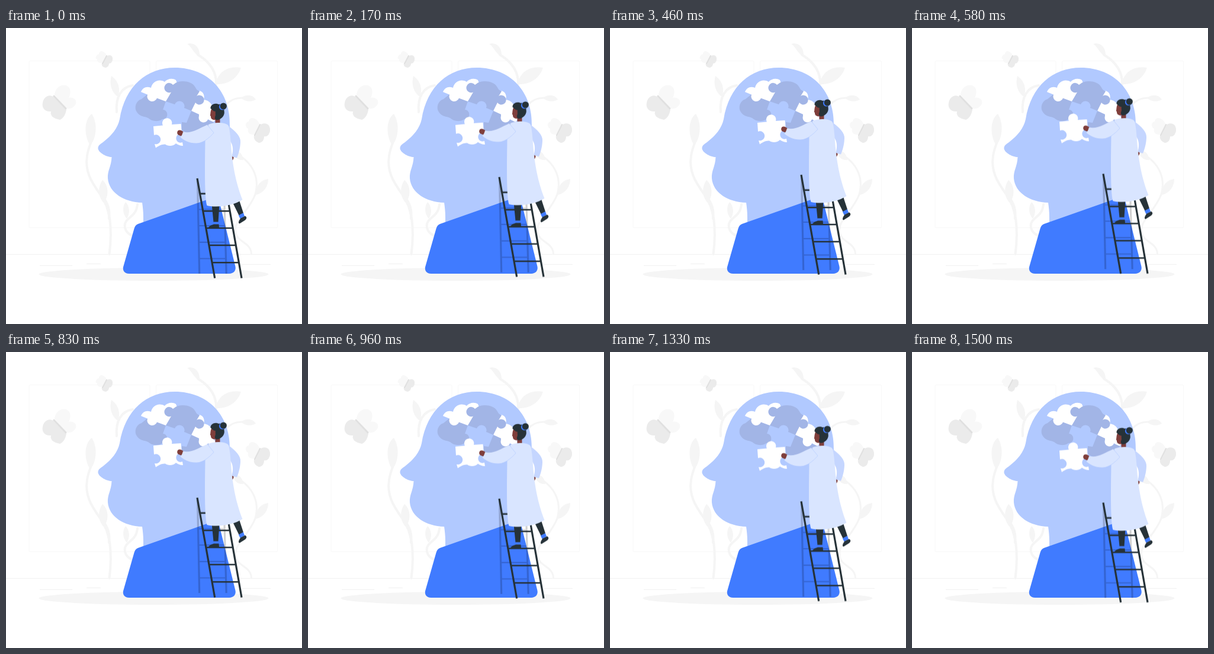
These frames come from a looping animation (500 px wide and 500 px high, 1.54 s). An HTML page:

```html
<!DOCTYPE html>
<html lang="en">
<head>
<meta charset="utf-8">
<title>Puzzle mind</title>
<style>
  html, body { margin: 0; width: 100%; height: 100%; overflow: hidden; background: #fff; }
  svg { display: block; width: 100vw; height: 100vh; }
  .line { fill: none; stroke-linecap: round; }
  .blue { fill: #407bff; }
  .pale { fill: #b1c9ff; }
  .shade { fill: #a2b5e6; }
  .white { fill: #fff; }
  .dark { fill: #263238; }
  .skin { fill: #7f3e3b; }
  .coat { fill: #d9e5ff; }
</style>
</head>
<body>
<svg viewBox="0 0 500 500">
  <!-- room -->
  <g fill="none" stroke="#f5f5f5" stroke-width=".7">
    <rect x="39" y="55.500" width="204" height="282" rx="2"/>
    <rect x="253.500" y="55.500" width="205" height="282" rx="2"/>
    <path stroke="#ebebeb" d="M0 382.400H500M136 398.400H160M57 401.400H112M399 399.400H447"/>
  </g>

  <!-- plants -->
  <g class="line" stroke="#f5f5f5" stroke-width="4">
    <path d="M174.500 382C180 340 177 306 160 282C143 259 133 241 137 216C139 202 143 196 146 186"/>
    <path d="M174 322C176 307 172 298 165 286"/>
    <path d="M214 351C200 346 196 331 207 322C214 316 221 311 222 298"/>
    <path d="M187 142C185 117 194 100 214 97"/>
    <path d="M355 95C356 72 342 56 324 45"/>
    <path stroke-width="3" d="M372 130C378 122 387 118 400 118"/>
    <path stroke-width="3" d="M388 212C416 226 429 252 421 281C411 309 383 326 388 346C392 363 414 362 414.500 382"/>
  </g>
  <g fill="#f5f5f5">
    <path d="M145 145C132 154 131 181 142 198C152 188 156 163 145 145Z"/>
    <path d="M163 257C155 267 155 286 165 295C174 285 174 266 163 257Z"/>
    <path d="M202 294C196 302 197 315 204 322C210 313 209 301 202 294Z"/>
    <path d="M178 81C174 96 179 110 189 116C194 103 190 89 178 81Z"/>
    <path d="M306 27C317 23 328 32 327 47C317 45 315 32 306 27Z"/>
    <path d="M397 67C375 63 357 75 354 95C374 96 391 86 397 67Z"/>
    <path d="M397 118C405 112 417 112 422 121C412 126 403 124 397 118Z"/>
    <path d="M443 255C428 257 421 269 422 282C435 279 443 268 443 255Z"/>
    <path d="M383 207C394 206 400 213 401 223C391 224 384 217 383 207Z"/>
  </g>

  <!-- butterflies -->
  <g fill="#f8f8f8">
    <path d="M82 113C83 98 98 93 105 99C111 104 108 114 106 118C114 116 120 122 118 128C113 137 106 137 102 136Z"/>
    <path d="M170 46C166 38 157 37 157 44C151 46 150 52 154 53C153 58 158 59 162 59Z"/>
    <path d="M428 162C424 151 411 149 410 158C403 159 404 168 409 170C407 178 414 181 419 180Z"/>
  </g>
  <g fill="#ebebeb">
    <path d="M80 116C71 111 64 117 62 126C60 135 66 142 76 141C74 148 80 153 91 155C98 152 101 144 102 138Z"/>
    <path d="M171 47C177 44 181 48 180 54C179 58 177 60 174 60C174 64 171 67 168 67C163 66 161 63 162 60Z"/>
    <path d="M430 163C440 158 447 164 446 174C444 182 440 184 436 183C436 190 432 194 427 194C420 191 418 186 419 182Z"/>
  </g>
  <g class="line" stroke="#e0e0e0" stroke-width="3">
    <path d="M81 115L101 136"/>
    <path stroke-width="2" d="M170 47L163 60M429 163L420 181"/>
  </g>

  <ellipse cx="249.500" cy="416" rx="194" ry="11" fill="#f5f5f5"/>

  <!-- head and bust -->
  <path class="pale" d="M232 340L232 320C232 310 231 302 230 295C199 294 174 278 172 254C171 241 178 234 178.500 218C170 218 157 211 155.500 204C155 198 160 196 165 192C178 182 189 169 192 154C201 98 238 67 285 67C342 67 380 108 378 166C377 210 350 240 358 292L300 340Z"/>
  <path class="blue" d="M223 331L358 283.500L387.500 403C389 410 384 415 377 415H208C200 415 196 409 198.500 402L216.500 339Q218 333 223 331Z"/>

  <!-- brain -->
  <path class="shade" d="M229 120C219 123 216 135 221 142C226 150 234 149 240 152C247 158 257 159 264 154C276 154 274 138 265 138L270 124L239 112Z"/>
  <path class="white" d="M228 108C231 100 238 98 245 101C247 91 258 85 268 91C272 86 281 84 287 88L290 96L270 124L255 118.500A8.200 8.200 0 1 1 239 112.500Z"/>
  <path class="white" d="M327 106C334 108 336 115 334 121C348 123 351 135 349 146C355 150 355 156 350 159L341 154A8.200 8.200 0 1 1 326 149L326 146L313 140L320 118Z"/>
  <path class="shade" d="M285 94C292 88 313 88 319 99C321 102 322 105 327 107L322 115A8 8 0 1 1 320 126L313 140L301 135A8.200 8.200 0 1 0 285 129L270 124L279 108.500A8.200 8.200 0 1 1 282 96Z"/>
  <path class="shade" d="M313 140L326 146L325.500 151A8.200 8.200 0 0 0 341 155L351 159C347 168 339 172 331 173C323 180 308 181 297 172L297 159L305 160Z"/>

  <g id="lift">
    <!-- ladder shadow -->
    <g fill="none" stroke="#000" stroke-width="3.200" opacity=".18">
      <path d="M323.500 256L326.700 415M368.500 280L372.200 415"/>
      <path stroke-width="2.200" d="M324 278.500H369M325 306.500H369.500M325.500 334H370M326 361.800H371M326.500 389.500H371.500"/>
    </g>

    <!-- puzzle piece -->
    <path class="white" d="M249 166L265 164.500A8.200 8.200 0 1 1 280 163L295.500 162L297 179A7.500 7.500 0 1 0 298 193L299 199C294 199 290 197 287 195C283 200 273 200 269 196.500C263 196 258 199 253 202.500L251 196A8 8 0 1 0 250 181Z"/>

    <!-- ladder -->
    <g fill="none" stroke="#263238" stroke-width="3.200">
      <path d="M323 254L352.700 422.500M368.500 254L398 422.500"/>
      <path stroke-width="2.400" d="M327 280H372M332.500 309.200H378M337.500 338H383M343 367H388M348 396.200H393"/>
    </g>

    <!-- legs -->
    <path class="dark" d="M347.500 297H360.500L358.500 328H350.500ZM381 291L393 288L401 312.500L393.500 316.500Z"/>
    <path class="blue" d="M350.500 327.500H358.500V332H350.500ZM392.800 316.500L401 312.300L403 318L395.500 322Z"/>
    <path class="dark" d="M342 337.500C344 333 348 333 351 331.500H359.500L360 337.500ZM393 329.500C393 325 395 324 396 321.500L404 317.500C407 319 407 322 404 324.500L394.500 330.500Z"/>

    <!-- far arm -->
    <path class="skin" d="M379 216L384.500 217.500C385 221 383 224 380 224.500Z"/>
    <path fill="#c5d6ff" d="M375 165C388 174 397 184 396 193C395.500 204 393 212 390 219.500L381.500 217C383.500 208 385 199 378 190Z"/>

    <!-- neck and head -->
    <path class="skin" d="M353.500 148H361.500V162H353.500Z"/>
    <path class="skin" d="M347 137C345.500 140 345.500 143 345.200 145.500L344.800 148L346 149C345.500 154 350 156 354 155L359 147L355 136Z"/>
    <path class="dark" d="M345.500 136C345 129 354 126 359 129C365 128 369.500 133 368.500 140C370 146 366 152 361 154C356 157 352 155 353 150C355 147 353 143 354 141C350 141 349 138 345.500 136Z"/>
    <circle class="blue" cx="365.500" cy="133" r="5.600"/>
    <circle class="dark" cx="367.300" cy="132" r="5.600"/>

    <!-- coat -->
    <path class="coat" d="M342 163C351 159 369 159 375 164C379 170 379.500 195 381.500 213C385 248 393 274 399.500 290C384 300 358 304 339.500 300C335 286 336 229 336.500 190Z"/>
    <path class="skin" d="M301 177C297 172 291 171 289.500 175C288 180 292 182 299 183Z"/>
    <path class="coat" d="M299 175.500C313 179 325 170 340 163.500L351 177C346 184 334 194 322 194.500C310 195 301 190 294.500 184.500C297 182 298 179 299 175.500Z"/>
    <path class="line" stroke="#b1c9ff" stroke-width=".6" d="M340.500 164L351 177C347 182 342 186 336.500 190"/>
  </g>
</svg>
<script>
  const LOOP = 1540;
  // time in ms, vertical shift in px
  const steps = [[0, 0], [708, -9.4], [1500, 0.4], [LOOP, 0.2]];
  document.getElementById('lift').animate(
    steps.map(([t, y]) => ({ offset: t / LOOP, transform: `translateY(${y}px)` })),
    { duration: LOOP, iterations: Infinity, easing: 'linear' }
  );
</script>
</body>
</html>
```
